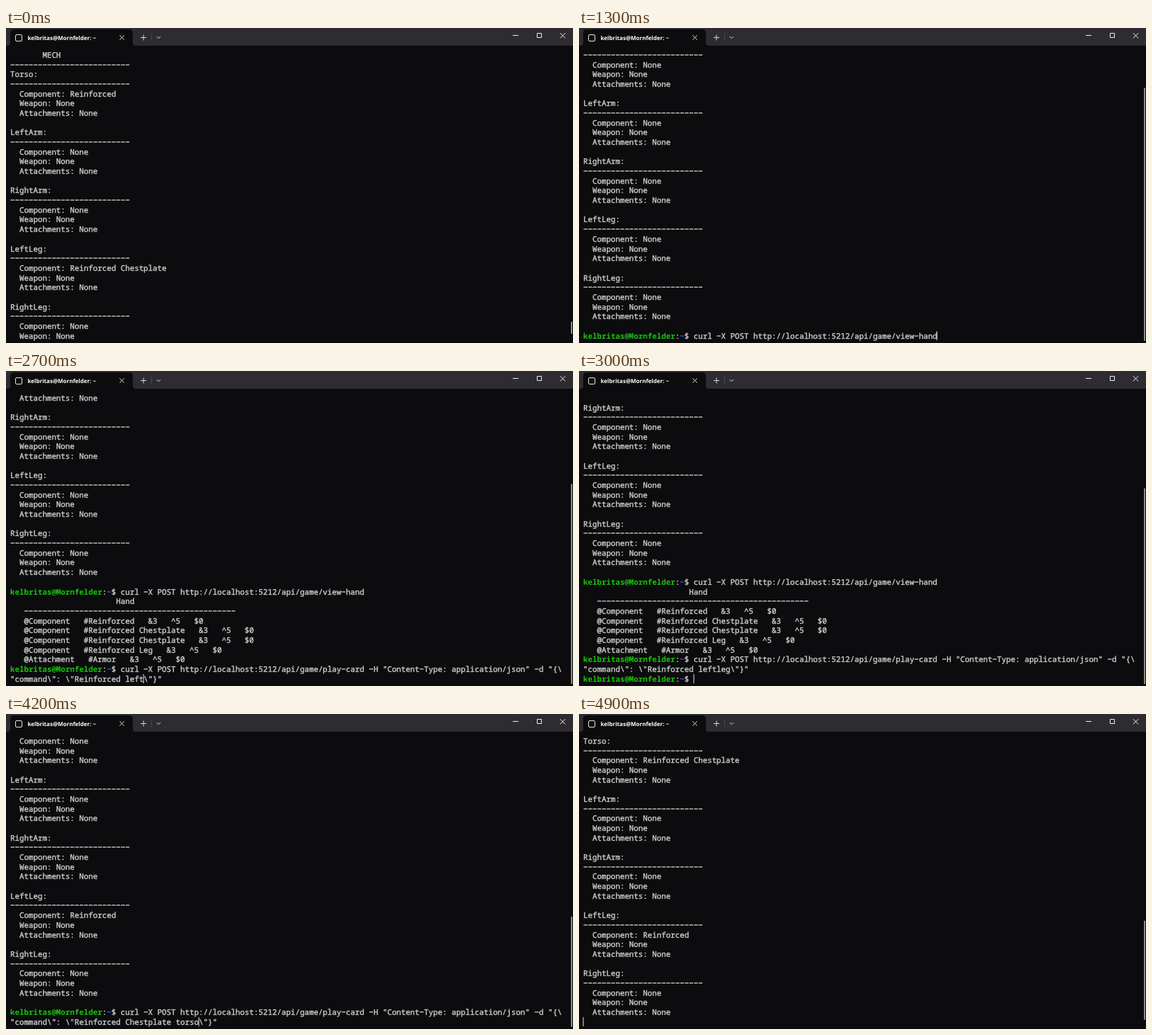
Write an HTML page with a canvas that moves like this. It is 800 px wide and 445 px high and loops after 5000 ms.

```html
<!DOCTYPE html>
<html lang="en">
<head>
<meta charset="utf-8">
<title>Terminal</title>
<style>
html, body { margin: 0; width: 100%; height: 100%; overflow: hidden; background: #0c0b0d; }
canvas { display: block; }
</style>
</head>
<body>
<canvas id="stage" width="800" height="445"></canvas>
<script>
const ctx = document.getElementById('stage').getContext('2d');
const LOOP = 5000, COLS = 120, ROWS = 30, CW = 6.487, LH = 13.68, LEFT = 6;
const BAR_TOP = 37, BAR_LEN = 405;
const USER = 'kelbritas@Mornfelder', PROMPT = USER + ':~$ ';
const FG = '#cccccc', GREEN = '#16c60c', BLUE = '#3b78ff';
const MONO = '10.8px "Noto Sans Mono", "DejaVu Sans Mono", monospace';

// ---- terminal contents ----
const rule = '-'.repeat(26);
const part = (name, component = 'None') => [
  name + ':', rule, '  Component: ' + component, '  Weapon: None', '  Attachments: None', ''];
const mech = (torso, leftLeg) => [
  '       MECH', rule, ...part('Torso', torso), ...part('LeftArm'), ...part('RightArm'),
  ...part('LeftLeg', leftLeg), ...part('RightLeg')];
const card = (kind, name) => `   @${kind}   #${name}   &3   ^5   $0`;
const hand = [
  ' '.repeat(23) + 'Hand', '   ' + '-'.repeat(46),
  card('Component', 'Reinforced'),
  card('Component', 'Reinforced Chestplate'),
  card('Component', 'Reinforced Chestplate'),
  card('Component', 'Reinforced Leg'),
  card('Attachment', 'Armor')];

const post = path => 'curl -X POST http://localhost:5212/api/game/' + path;
const play = text => post('play-card') +
  ` -H "Content-Type: application/json" -d "{\\"command\\": \\"${text}\\"}"`;
const STATS = post('mech-stats'), VIEW = post('view-hand');

// ---- session script ----
const wrap = s => s.match(new RegExp(`.{1,${COLS}}`, 'g')) || [''];
const shots = [];
let log = [];

function shot(t, line, opts = {}) {
  const at = line.length - (opts.back || 0);
  shots.push({
    t, lines: log.concat(wrap(line)),
    caretRow: log.length + Math.floor(at / COLS), caretCol: at % COLS, ...opts });
}
const prompt = (t, cmd = '', opts) => shot(t, PROMPT + cmd, opts);
const run = (cmd, output = []) => log.push(...wrap(PROMPT + cmd), ...output);
const edit = (t, texts) =>
  texts.forEach((s, i) => prompt(t + i * 100, play(s), { back: 4 }));

const before = mech('Reinforced', 'Reinforced Chestplate');
log = Array(680).fill('').concat(before.slice(0, 29));
shot(0, before[29], { bar: [415, 432], hideCaret: true });
log.push(...before.slice(29));
prompt(100);
prompt(200, 'clear');

log = [];
prompt(300);
prompt(400, STATS);
run(STATS, mech());
prompt(500);
prompt(700, '', { top: 0, bar: [39, 386], mouse: [127, 397] });
prompt(1000);
prompt(1200, VIEW);
run(VIEW, hand);
prompt(1400);
prompt(1700, VIEW);
prompt(1800, STATS);

edit(2000, ['Reinforced Chestplate leftleg', 'Reinforced Chestplate', 'Reinforced Chest',
  'Reinforced ', 'Reinforced ', 'Reinforced l', 'Reinforced le', 'Reinforced left',
  'Reinforced leftl', 'Reinforced leftleg']);
run(play('Reinforced leftleg'));
prompt(3000);
prompt(3200, STATS);
run(STATS, mech('None', 'Reinforced'));
prompt(3300);
prompt(3400, '', { mouse: [263, 306] });
prompt(3500, STATS, { mouse: [263, 306], hideCaret: true });

edit(3600, ['Reinforced leftleg', 'Reinforced ', 'Reinforced Che', 'Reinforced Chestpl',
  'Reinforced Chestplate ', 'Reinforced Chestplate tor', 'Reinforced Chestplate torso']);
run(play('Reinforced Chestplate torso'));
prompt(4400);
prompt(4700, STATS);
run(STATS, mech('Reinforced Chestplate', 'Reinforced').slice(0, -1));
shot(4900, '', { bar: [292, 432] });

// ---- drawing ----
function stroke(color, width, ...paths) {
  ctx.strokeStyle = color;
  ctx.lineWidth = width;
  ctx.beginPath();
  for (const [start, ...rest] of paths) {
    ctx.moveTo(...start);
    rest.forEach(p => ctx.lineTo(...p));
  }
  ctx.stroke();
}
const cross = (x, y, r) => [[[x - r, y - r], [x + r, y + r]], [[x - r, y + r], [x + r, y - r]]];

function drawWindow() {
  ctx.fillStyle = '#0c0b0d';
  ctx.fillRect(0, 0, 800, 445);
  ctx.fillStyle = '#2e2c30';
  ctx.fillRect(0, 0, 800, 25);

  ctx.fillStyle = '#0c0b0d';
  ctx.beginPath();
  ctx.moveTo(2, 25);
  ctx.quadraticCurveTo(6, 25, 6, 21);
  ctx.lineTo(6, 7);
  ctx.quadraticCurveTo(6, 2, 11, 2);
  ctx.lineTo(174, 2);
  ctx.quadraticCurveTo(179, 2, 179, 7);
  ctx.lineTo(179, 21);
  ctx.quadraticCurveTo(179, 25, 183, 25);
  ctx.fill();

  ctx.strokeStyle = '#e8e8e8';
  ctx.lineWidth = 1;
  ctx.beginPath();
  ctx.roundRect(13.5, 9.5, 9, 9, 1.5);
  ctx.stroke();

  ctx.font = '700 8px "Open Sans", "Noto Sans", sans-serif';
  ctx.fillStyle = '#ffffff';
  ctx.fillText(USER + ': ~', 30.5, 17);

  stroke('#e0e0e0', 1, ...cross(163.5, 13.5, 3.2));
  stroke('#d6d6d6', 1, [[190, 13.5], [198, 13.5]], [[194, 9.5], [194, 17.5]],
    [[212.5, 12], [215.3, 14.8], [218, 12]]);
  stroke('#4a484c', 1, [[205.5, 8], [205.5, 18]]);
  stroke('#f0f0f0', 1, [[715, 10.5], [723, 10.5]], ...cross(785.5, 10.8, 3.6));
  ctx.strokeRect(749.5, 7.5, 6, 6);
}

// a hairline outline gives the regular face its medium weight
function drawChar(ch, x, y, color, bold) {
  ctx.font = (bold ? '700 ' : '400 ') + MONO;
  ctx.fillStyle = ctx.strokeStyle = color;
  ctx.fillText(ch, x, y);
  if (!bold) ctx.strokeText(ch, x, y);
}

function drawLine(line, row) {
  const y = 41.9 + row * LH, isPrompt = line.startsWith(PROMPT);
  [...line].forEach((ch, i) => {
    if (ch === ' ') return;
    const isUser = isPrompt && i < USER.length;
    const isPath = isPrompt && i === USER.length + 1;
    // the minus sign has the wide dash of the terminal face
    drawChar(ch === '-' ? '\u2212' : ch, LEFT + i * CW, y,
      isUser ? GREEN : isPath ? BLUE : FG, isUser || isPath);
  });
}

function drawMouse(x, y) {
  const shape = [[0, 0], [0, 11.5], [2.7, 9], [4.6, 13], [6.3, 12.2], [4.5, 8.4], [8, 8.2]];
  ctx.beginPath();
  shape.forEach(([dx, dy]) => ctx.lineTo(x + dx, y + dy));
  ctx.closePath();
  ctx.fillStyle = '#ffffff';
  ctx.fill();
  ctx.strokeStyle = '#0c0b0d';
  ctx.lineWidth = 0.6;
  ctx.stroke();
}

function draw(s) {
  const total = s.lines.length, top = s.top ?? Math.max(0, total - ROWS);
  ctx.textRendering = 'geometricPrecision';
  ctx.lineJoin = 'round';
  drawWindow();
  ctx.lineWidth = 0.4;
  s.lines.slice(top, top + ROWS).forEach(drawLine);

  const row = s.caretRow - top;
  if (!s.hideCaret && row < ROWS) {
    ctx.fillStyle = '#e6e6e6';
    ctx.fillRect(Math.round(LEFT + s.caretCol * CW) - 0.5, 31.5 + row * LH, 1, 13);
  }
  if (total > ROWS) {
    const toY = n => BAR_TOP + n / total * BAR_LEN;
    const [a, b] = s.bar || [toY(top), toY(top + ROWS)];
    ctx.fillStyle = '#8a8a8a';
    ctx.fillRect(797, a, 2, b - a);
  }
  if (s.mouse) drawMouse(...s.mouse);
}

const start = performance.now();
let shown;
function tick() {
  const t = (performance.now() - start) % LOOP;
  const now = shots.findLast(s => s.t <= t);
  if (now !== shown) draw(shown = now);
  requestAnimationFrame(tick);
}
tick();
</script>
</body>
</html>
```
